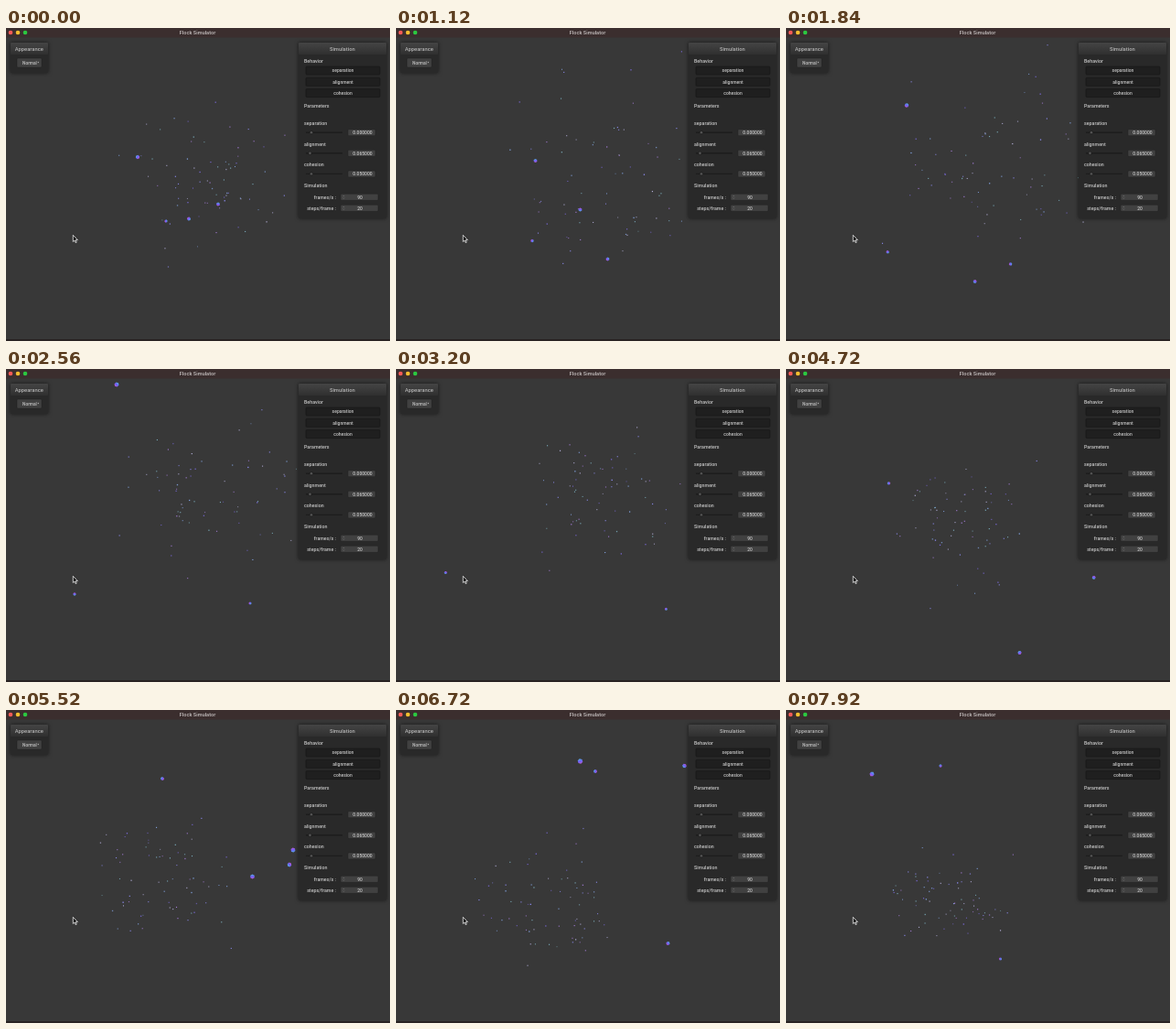
Recreate the animation shown at these times as an HTML page with a canvas. Size 420 by 342 pixels, loop 8000 ms.

```html
<!DOCTYPE html>
<html lang="en">
<head>
<meta charset="utf-8">
<title>Flock Simulator</title>
<style>
  html, body { margin: 0; width: 100%; height: 100%; overflow: hidden; background: #383838; }
  canvas, svg { position: absolute; left: 0; top: 0; width: 420px; height: 342px; display: block; }
  text { font: 500 5.3px Roboto, sans-serif; fill: #c4c4c4; }
  .head { font-size: 5.8px; fill: #b4b4b4; text-anchor: middle; }
  .title { font: 600 5.3px Inter, sans-serif; fill: #c6c0c0; text-anchor: middle; }
  .mid { text-anchor: middle; font-size: 5px; }
  .end { text-anchor: end; }
  .panel { fill: #292929; filter: drop-shadow(0 0 2px #0009); }
  .btn { fill: #1f1f1f; stroke: #171717; stroke-width: .6; }
  .box { fill: #414141; stroke: #222; stroke-width: .5; }
</style>
</head>
<body>
<canvas id="stage" width="420" height="342"></canvas>
<svg viewBox="0 0 420 342">
  <defs>
    <linearGradient id="bar" x2="0" y2="1">
      <stop stop-color="#444"/><stop offset="1" stop-color="#303030"/>
    </linearGradient>
  </defs>
  <rect width="420" height="10.5" fill="#3b2e2e"/>
  <circle cx="5" cy="5" r="2.3" fill="#fc5b57"/>
  <circle cx="13" cy="5" r="2.3" fill="#f5bd2f"/>
  <circle cx="21" cy="5" r="2.3" fill="#2bc840"/>
  <text class="title" x="209.5" y="7">Flock Simulator</text>
  <rect y="340" width="420" height="2" fill="#282222"/>

  <rect class="panel" x="5" y="16" width="41" height="33" rx="1"/>
  <rect x="5" y="16" width="41" height="13" rx="1" fill="url(#bar)"/>
  <text class="head" x="25.3" y="25">Appearance</text>
  <rect class="box" x="12" y="33" width="27" height="10" rx="1"/>
  <text x="18" y="39.7" style="font-size:4.8px">Normal</text>
  <circle cx="35.3" cy="37.5" r=".7" fill="#aaa"/>

  <rect class="panel" x="320" y="16" width="96" height="192" rx="1"/>
  <rect x="320" y="16" width="96" height="13" rx="1" fill="url(#bar)"/>
  <text class="head" x="367.8" y="25">Simulation</text>
  <g id="controls"></g>

  <path d="M73.3 226.3v7.2l1.7-1.5 1.1 2.6 1.2-.5-1.1-2.5h2.2z" fill="#111" stroke="#eee" stroke-width=".8"/>
</svg>
<script>
const LOOP = 8000, STEP = 80, COUNT = 72;
const ctx = document.getElementById('stage').getContext('2d');

// Panel widgets
const label = (x, y, s, cls = '') => `<text x="${x}" y="${y}" class="${cls}">${s}</text>`;
const box = (cls, x, y, w, h) => `<rect class="${cls}" x="${x}" y="${y}" width="${w}" height="${h}" rx="1"/>`;
const slider = (name, y, knob, value) =>
  label(326, y - 8, name) +
  `<path d="M328 ${y}h40" stroke="#1d1d1d" stroke-width="1.4"/>` +
  `<circle cx="${knob}" cy="${y}" r="1.7" fill="#555" stroke="#191919" stroke-width=".6"/>` +
  box('box', 374, y - 3.5, 30, 7) + label(390, y + 1.9, value, 'mid');
const spinner = (name, y, value) =>
  label(361, y + 1.8, name, 'end') + box('box', 366, y - 3.5, 41, 7) +
  `<path d="M368.5 ${y - .7}l.8-.9.8.9M368.5 ${y + .7}l.8.9.8-.9" fill="none" stroke="#999" stroke-width=".4"/>` +
  label(387, y + 1.8, value, 'mid');

document.getElementById('controls').innerHTML =
  label(326, 38, 'Behavior') +
  ['separation', 'alignment', 'cohesion'].map((s, i) =>
    box('btn', 328, 42 + 12.3 * i, 81, 9) + label(368.5, 48.4 + 12.3 * i, s, 'mid')).join('') +
  label(326, 87.3, 'Parameters') +
  slider('separation', 114.2, 334, '0.000000') +
  slider('alignment', 136.8, 332.5, '0.065000') +
  slider('cohesion', 159.4, 334, '0.050000') +
  label(326, 174, 'Simulation') +
  spinner('frames/s :', 184.8, '90') +
  spinner('steps/frame :', 196.8, '20');

// Smooth curve through rows of [time, ...values]
function along(keys, t) {
  let i = 0;
  while (i < keys.length - 2 && t >= keys[i + 1][0]) i++;
  const a = keys[i], b = keys[i + 1], p = keys[i - 1] || a, n = keys[i + 2] || b;
  const span = b[0] - a[0], u = (t - a[0]) / span, v = u * u, w = v * u;
  return a.slice(1).map((q, j) => {
    const k = j + 1;
    const m0 = (b[k] - p[k]) / (b[0] - p[0]) * span;
    const m1 = (n[k] - q) / (n[0] - a[0]) * span;
    return (2 * w - 3 * v + 1) * q + (w - 2 * v + u) * m0 + (3 * v - 2 * w) * b[k] + (w - v) * m1;
  });
}

// Time, centre x, centre y, spread x, spread y
const flock = [
  [0, 214, 161, 36, 33], [1120, 221, 160, 44, 44], [2560, 236, 137, 46, 34],
  [3840, 221, 149, 25, 28], [5520, 168, 184, 35, 31], [6720, 168, 214, 32, 26],
  [7920, 178, 207, 29, 21]
];
// Time, x, y, radius
const leaders = [
  [[0, 144, 141, 2.3], [1120, 152.5, 145, 2.1], [2560, 121, 17, 2.6], [3840, 200, -40, 2],
   [4700, 338, 30, 2], [5520, 314, 153, 2.6], [6720, 315.5, 61, 2.4], [7920, 380, 34, 2]],
  [[0, 232, 192.5, 2.1], [1120, 231.5, 252.5, 2], [2560, 267, 256, 1.6], [3840, 324, 264, 1.6],
   [4600, 338, 235, 2], [5520, 310, 169, 2.4], [6720, 218, 67, 2], [7920, 169, 61, 1.7]],
  [[0, 175, 211, 1.7], [1120, 149, 232.5, 1.8], [2560, 75, 246, 1.7], [3840, 55, 186, 1.7],
   [5520, 171, 75, 2], [6720, 201.5, 56, 2.9], [7920, 94, 70, 2.6]],
  [[0, 200, 208.5, 2.1], [1120, 201.5, 198.5, 2.1], [2560, 215, 352, 2], [4400, 250, 350, 2],
   [5520, 269.5, 182, 2.6], [6720, 297.5, 255, 2.1], [7920, 234.5, 272, 1.6]]
];

let seed = 41;
const rnd = () => (seed = seed * 16807 % 2147483647) / 2147483647;
const tints = ['#8d8cf0', '#7a6ad8', '#86a8e8', '#b9b4e0', '#7fb4c4', '#a77fdc'];
const birds = Array.from({ length: COUNT }, (_, i) => {
  const axis = () => ({ amp: .45 + 1.9 * rnd() * rnd() + .5 * rnd(), speed: .7 + .7 * rnd(), phase: 6.283 * rnd() });
  return { x: axis(), y: axis(), tint: tints[i % tints.length], size: 1 + .35 * rnd(), light: .55 + .45 * rnd() };
});
const swing = (a, t) => 1.3 * a.amp * Math.sin(a.speed * t / 1000 + a.phase);

function drawLeader([x, y, r], turn) {
  const dx = Math.cos(turn) * r, dy = Math.sin(turn) * r;
  const g = ctx.createLinearGradient(x - dx, y - dy, x + dx, y + dy);
  g.addColorStop(0, '#58b4e6');
  g.addColorStop(.5, '#6c62f4');
  g.addColorStop(1, '#c05ad8');
  ctx.fillStyle = g;
  ctx.beginPath();
  for (let i = 0; i < 6; i++) {
    const a = turn + i * Math.PI / 3;
    ctx.lineTo(x + r * Math.cos(a), y + r * Math.sin(a));
  }
  ctx.fill();
}

function draw(t) {
  ctx.globalAlpha = 1;
  ctx.fillStyle = '#383838';
  ctx.fillRect(0, 0, 420, 342);
  const [cx, cy, sx, sy] = along(flock, t);
  for (const b of birds) {
    ctx.globalAlpha = b.light;
    ctx.fillStyle = b.tint;
    ctx.fillRect(cx + sx * swing(b.x, t) - .5, cy + sy * swing(b.y, t) - .5, b.size, b.size);
  }
  ctx.globalAlpha = 1;
  leaders.forEach((path, i) => drawLeader(along(path, t), i * 1.1 + .6 + t / 1400));
}

const start = performance.now();
function tick() {
  const t = Math.max(0, performance.now() - start) % LOOP;
  draw(Math.floor(t / STEP) * STEP);
  requestAnimationFrame(tick);
}
tick();
</script>
</body>
</html>
```
